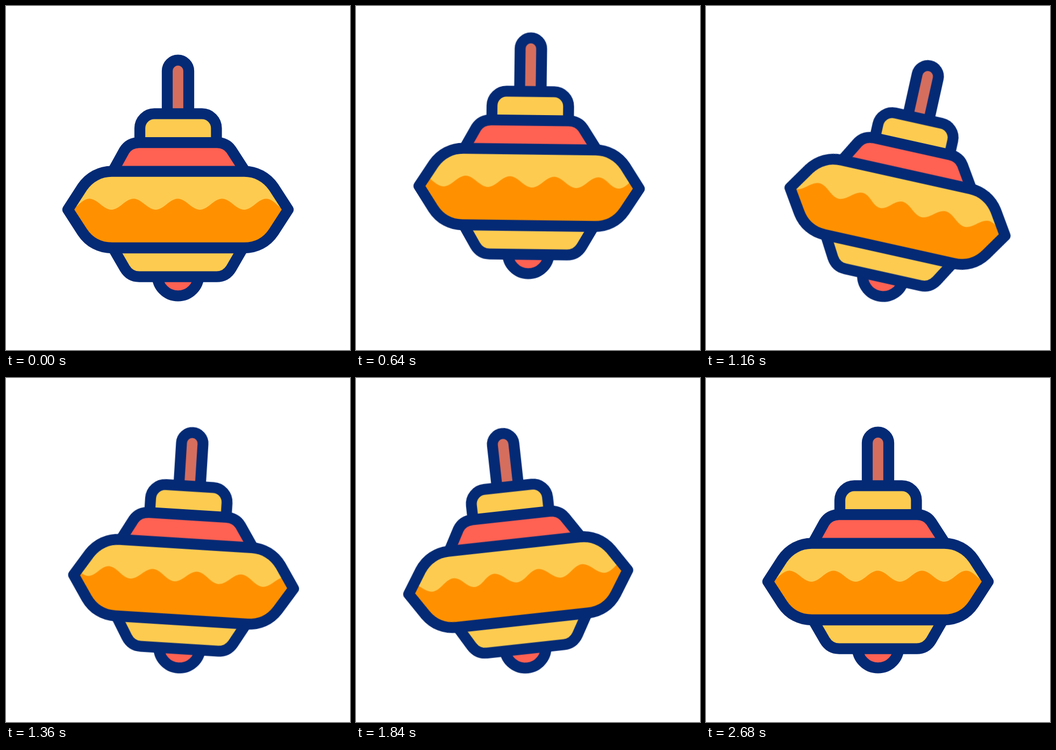
An HTML page without scripts that plays this animation: 640x640 px, repeating every 3000 ms.

```html
<!DOCTYPE html>
<html lang="en">
<head>
<meta charset="utf-8">
<title>Spinning top</title>
<style>
  html, body { margin: 0; width: 100%; height: 100%; overflow: hidden; background: #fff; }
  svg { display: block; width: 100%; height: 100%; }

  .outline { stroke: #042a75; stroke-width: 20.3; stroke-linejoin: round; }
  .yellow { fill: #fdcb50; }
  .orange { fill: #ff9100; }
  .red { fill: #ff6152; }
  .brown { fill: #d66e5e; }
  .none { fill: none; }

  .hop, .tilt, .spin { animation: 3s linear infinite; }
  .hop { animation-name: hop; }
  .tilt { animation-name: tilt; transform-origin: 320px 546px; }
  .spin { animation-name: spin; }

  @keyframes hop {
    0% { transform: translateY(0); }
    6.667% { transform: translateY(0); animation-timing-function: cubic-bezier(.333, .9, .667, 1); }
    17% { transform: translateY(-46.5px); animation-timing-function: cubic-bezier(.333, 0, .667, .167); }
    28%, 100% { transform: translateY(0); }
  }
  @keyframes tilt {
    0% { transform: rotate(0deg); }
    18.667% { transform: rotate(0deg); animation-timing-function: cubic-bezier(.333, 0, .667, 1); }
    37.4% { transform: rotate(12.9deg); animation-timing-function: cubic-bezier(.333, 0, .667, 1); }
    54% { transform: rotate(-6.95deg); animation-timing-function: cubic-bezier(.5, 0, .3, 1); }
    86.667%, 100% { transform: rotate(0deg); }
  }
  /* two whole wave tiles, so the loop closes */
  @keyframes spin {
    0% { transform: translateX(0); }
    6.667% { transform: translateX(0); animation-timing-function: cubic-bezier(.57, 0, .43, 1); }
    86.133%, 100% { transform: translateX(-810px); }
  }
</style>
</head>
<body>
<svg viewBox="0 0 640 640">
  <defs>
    <path id="body" d="M115 378.8 L142 337 C155 318 175 307.6 197 307.6 H443 C465 307.6 485 318 498 337 L525 378.8 L498 420.5 C485 440 465 450 443 450 H197 C175 450 155 440 142 420.5 Z"/>
    <clipPath id="inside"><use href="#body"/></clipPath>
    <!-- five crests, the last trough a little narrower -->
    <path id="wave" d="M0 358.4 c15.2 0 26 20.5 41.15 20.5 s26 -20.5 41.15 -20.5 s26 20.5 41.15 20.5 s26 -20.5 41.15 -20.5 s26 20.5 41.15 20.5 s26 -20.5 41.15 -20.5 s26 20.5 41.15 20.5 s26 -20.5 41.15 -20.5 s23 20.5 37.9 20.5 s23 -20.5 37.9 -20.5 h1 v100 h-406.1 z"/>
  </defs>

  <g class="hop">
    <g class="tilt">
      <g class="outline">
        <path class="brown" d="M300 201 V120.7 a20 20 0 0 1 40 0 V201"/>
        <path class="yellow" d="M249 254 V227.4 a27 27 0 0 1 27 -27 H364.5 a27 27 0 0 1 27 27 V254"/>
        <path class="red" d="M199 307 L220 269 C226 259.5 236 254.2 248 254.2 H392 C404 254.2 413 259 419 267.5 L444.5 307"/>
        <path class="red" d="M281.6 501 a38.4 38.4 0 0 0 76.8 0"/>
        <path class="yellow" d="M199 450 L221 488 C227 498 236 503.6 248 503.6 H392 C404 503.6 413 498 419 488 L441 450"/>
      </g>
      <use href="#body" class="yellow"/>
      <g clip-path="url(#inside)">
        <g class="spin orange">
          <use href="#wave" x="-250"/>
          <use href="#wave" x="155"/>
          <use href="#wave" x="560"/>
          <use href="#wave" x="965"/>
        </g>
      </g>
      <use href="#body" class="outline none"/>
    </g>
  </g>
</svg>
</body>
</html>
```
